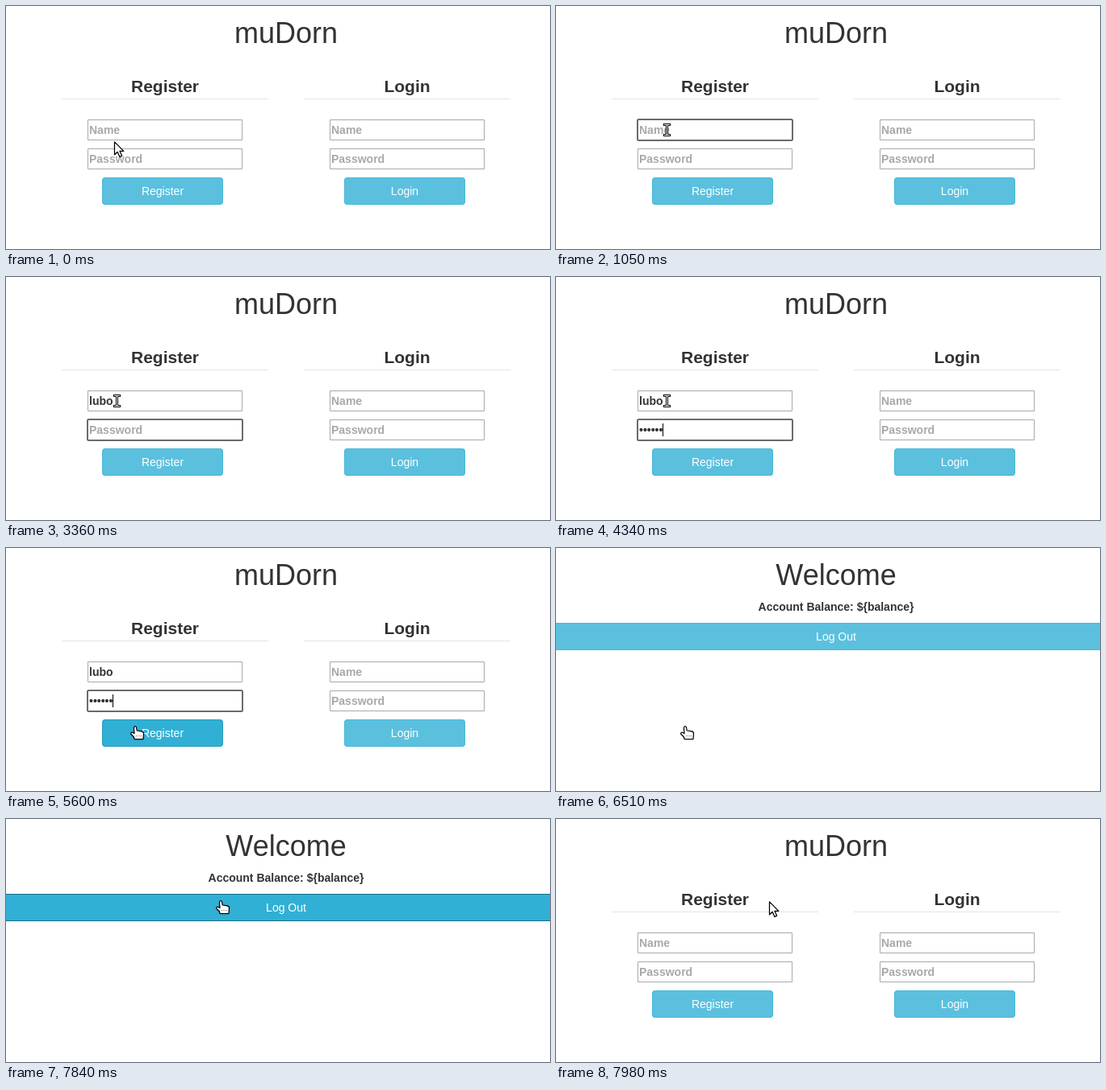
Animation, 674 px wide and 302 px high, one loop 8000 ms. Source, as an HTML page with a canvas:

```html
<!DOCTYPE html>
<html lang="en">
<head>
<meta charset="utf-8">
<title>Register and log in</title>
<style>
  html, body { margin: 0; width: 100%; height: 100%; overflow: hidden; background: #fff; }
  canvas { display: block; }
</style>
</head>
<body>
<canvas id="stage" width="674" height="302"></canvas>
<script>
const ctx = document.getElementById('stage').getContext('2d');
const LOOP = 8000;
const SANS = '"Liberation Sans", Arial, sans-serif';
const INK = '#333', HINT = '#a9a9a9';

// Button looks: [fill, border]
const LOOKS = {
  idle: ['#5bc0de', '#46b8da'],
  hover: ['#31b0d5', '#269abc'],
  focus: ['#31b0d5', '#1b6d85'],
  press: ['#269abc', '#1b6d85']
};

// Timelines: each entry starts with the time from which it holds
const NAME = [[0, ''], [1400, 'l'], [1470, 'lu'], [1750, 'lub'], [1960, 'lubo'], [7910, '']];
const DOTS = [[0, 0], [3570, 1], [3710, 2], [3850, 3], [3990, 4], [4130, 5], [4340, 6], [7910, 0]];
const FOCUS = [[0, ''], [490, 'name'], [2730, 'password'], [5740, '']];
const CARET = [[0, false], [560, true], [1050, false], [1400, true], [2520, false], [2800, true],
  [3360, false], [3570, true], [4970, false], [5600, true], [5740, false]];
const REGISTER = [[0, 'idle'], [5250, 'hover'], [5740, 'press'], [5810, 'focus'], [6510, 'idle']];
const LOGOUT = [[0, 'idle'], [7350, 'hover'], [7770, 'press'], [7840, 'focus']];
const POINTER = [
  [0, 'arrow', 134, 168], [70, 'arrow', 136, 168], [140, 'beam', 133, 161], [210, 'beam', 128, 157],
  [280, 'beam', 132, 155], [350, 'beam', 137, 154], [4970, 'beam', 133, 190], [5040, 'arrow', 132, 211],
  [5250, 'hand', 137, 217], [5320, 'hand', 149, 223], [5390, 'hand', 158, 222],
  [6580, 'arrow', 158, 222], [7490, 'hand', 264, 102], [7980, 'arrow', 264, 102]
];

const SHAPES = {
  arrow: new Path2D('M.5 .8V16.8L4.2 13.3L6.9 19.4L9.6 18.2L6.9 12.3H11.8Z'),
  hand: new Path2D('M.5 2.2Q.5 -.5 2 -.5Q3.4 -.5 3.7 2L4.2 5L9 5.6Q12.5 6 12.5 8.2L12 15.5H1.2L.2 12.5L-3.2 9.3Q-3.6 7 -1.5 7.2L1 8.6Z')
};

const entry = (list, t) => list.findLast(e => e[0] <= t);
const at = (list, t) => entry(list, t)[1];

function text(str, x, y, size, { bold = false, color = INK, align = 'center', family = SANS } = {}) {
  ctx.font = `${bold ? 'bold ' : ''}${size}px ${family}`;
  ctx.fillStyle = color;
  ctx.textAlign = align;
  ctx.fillText(str, x, y);
}

function rect(x, y, w, h, color) {
  ctx.fillStyle = color;
  ctx.fillRect(x, y, w, h);
}

function outline(x, y, w, h, radius, color, width = 1) {
  ctx.beginPath();
  ctx.roundRect(x, y, w, h, radius);
  ctx.strokeStyle = color;
  ctx.lineWidth = width;
  ctx.stroke();
}

function field(x, y, hint, value = '', focused = false, caret = false) {
  const opts = { bold: true, align: 'left', color: value ? INK : HINT };
  outline(x + .5, y + .5, 191, 25, 0, HINT);
  if (focused) outline(x, y, 192, 26, 1.5, '#6b6b6b', 2);
  text(value || hint, x + 2, y + 18, 14, opts);
  if (caret) rect(Math.round(x + 2 + (value ? ctx.measureText(value).width : 0)), y + 5, 1, 16, '#000');
}

function button(x, y, w, radius, label, cx, look) {
  const [fill, border] = LOOKS[look];
  ctx.beginPath();
  ctx.roundRect(x, y, w, 34, radius);
  ctx.fillStyle = fill;
  ctx.fill();
  if (look === 'press') {
    const shade = ctx.createLinearGradient(0, y, 0, y + 7);
    shade.addColorStop(0, 'rgba(0,0,0,.125)');
    shade.addColorStop(1, 'rgba(0,0,0,0)');
    ctx.fillStyle = shade;
    ctx.fill();
  }
  outline(x + .5, y + .5, w - 1, 33, radius, border);
  text(label, cx, y + 22, 14, { color: '#fff' });
}

function form(x, title, look, name, password) {
  text(title, x + 128, 107, 21, { bold: true });
  rect(x, 115, 256, 1, '#e5e5e5');
  field(x + 32, 141, 'Name', ...name);
  field(x + 32, 177, 'Password', ...password);
  button(x + 50, 213, 150, 4, title, x + 125, look);
}

function suggestion(t) {
  if (t < 1470 || t >= 2940) return;
  ctx.globalAlpha = Math.min(1, (2940 - t) / 280);
  rect(101, 168, 192, 25, '#fff');
  rect(101, 168, 1, 25, '#c4c4c4');
  rect(292, 168, 1, 25, '#c4c4c4');
  rect(101, 192, 192, 1, '#c4c4c4');
  text('Lubo', 110, 185, 14, { bold: true, color: '#000', align: 'left', family: '"Noto Sans", sans-serif' });
  ctx.globalAlpha = 1;
}

function entryPage(t) {
  const focus = at(FOCUS, t), caret = at(CARET, t);
  const state = (id, value) => [value, focus === id, focus === id && caret];
  text('muDorn', 347, 46, 36);
  form(69, 'Register', at(REGISTER, t), state('name', at(NAME, t)), state('password', '•'.repeat(at(DOTS, t))));
  form(369, 'Login', 'idle', [], []);
  suggestion(t);
}

function accountPage(t) {
  text('Welcome', 347, 46, 36);
  text('Account Balance: ${balance}', 347, 78, 14, { bold: true });
  button(-10, 93, 714, 4, 'Log Out', 347, at(LOGOUT, t));
}

function pointer(t) {
  let [, kind, x, y] = entry(POINTER, t);
  if (t >= 7000 && t < 7490) {
    const p = (Math.floor((t - 7000) / 70) + 1) / 8;
    const ease = p * p * (3 - 2 * p);
    x = Math.round(158 + 106 * ease);
    y = Math.round(222 - 120 * ease);
    kind = t >= 7350 ? 'hand' : 'arrow';
  }
  ctx.save();
  ctx.translate(x, y);
  if (kind === 'beam') {
    for (const [grow, color] of [[1, '#000'], [0, '#fff']]) {
      for (const [bx, by, w, h] of [[-3, -7, 7, 1], [0, -7, 1, 14], [-3, 6, 7, 1]])
        rect(bx - grow, by - grow, w + 2 * grow, h + 2 * grow, color);
    }
  } else {
    const shape = SHAPES[kind];
    ctx.shadowColor = 'rgba(0,0,0,.3)';
    ctx.shadowBlur = 2;
    ctx.shadowOffsetY = 1;
    ctx.fillStyle = '#fff';
    ctx.fill(shape);
    ctx.shadowColor = 'transparent';
    ctx.strokeStyle = '#000';
    ctx.lineWidth = 1.2;
    ctx.lineJoin = 'round';
    ctx.stroke(shape);
    if (kind === 'hand') for (const dx of [3, 5, 7, 9]) rect(dx, 11, 1, 1, '#777');
  }
  ctx.restore();
}

function draw(now) {
  const t = now % LOOP;
  rect(0, 0, 674, 302, '#fff');
  (t >= 6510 && t < 7910 ? accountPage : entryPage)(t);
  pointer(t);
  requestAnimationFrame(draw);
}

const start = performance.now();
draw(0);
function tick() {}
requestAnimationFrame = (raf => cb => raf.call(window, () => cb(Math.max(0, performance.now() - start))))(requestAnimationFrame);
</script>
</body>
</html>
```
